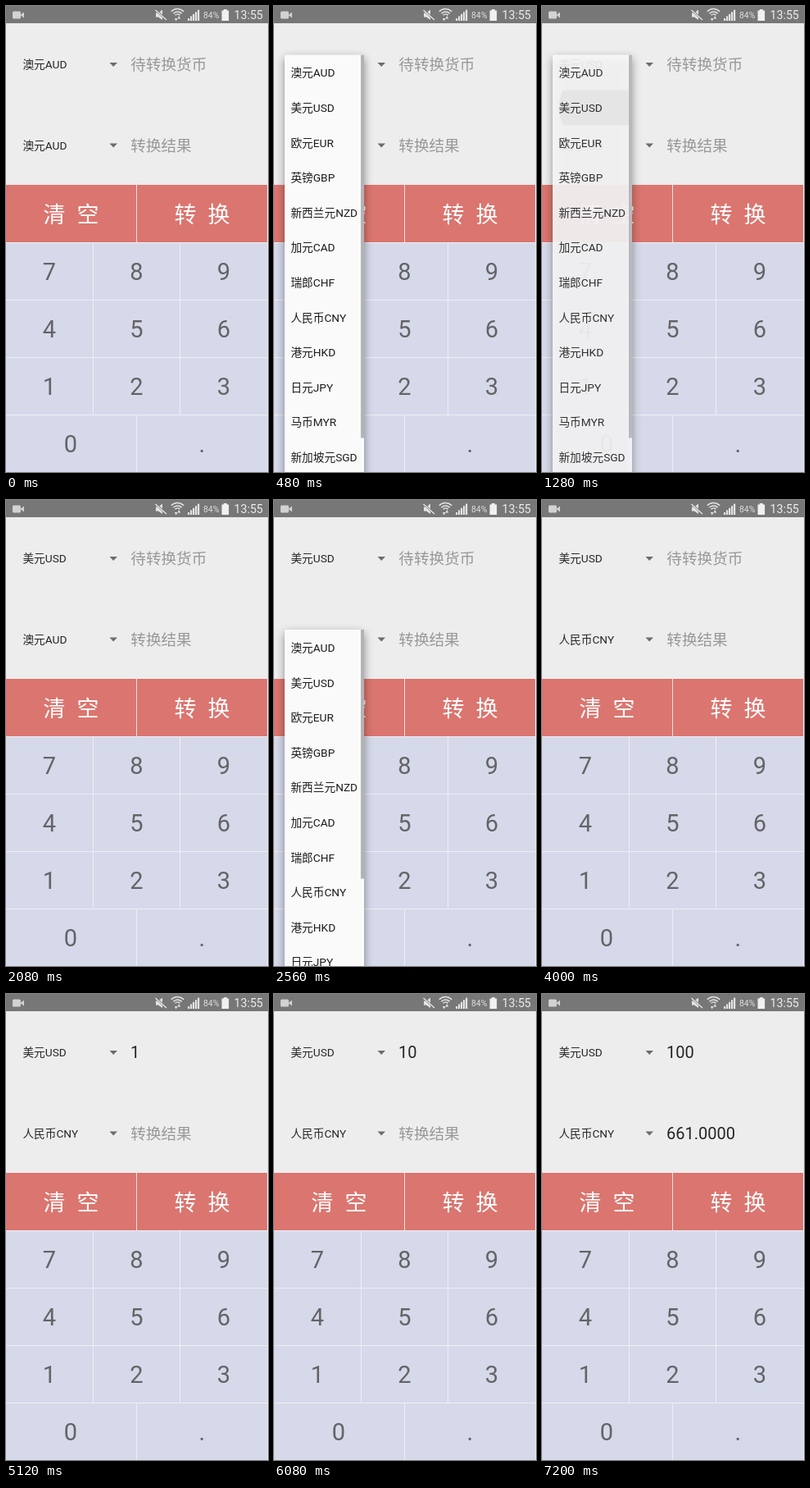
These frames come from a looping animation (320x568 px, 7360 ms). An HTML page with a canvas:

```html
<!DOCTYPE html>
<html lang="zh-CN">
<head>
<meta charset="utf-8">
<title>货币转换</title>
<style>
  html, body { margin: 0; width: 100%; height: 100%; overflow: hidden; background: #ededee; }
  canvas { display: block; width: 320px; height: 568px; }
</style>
</head>
<body>
<canvas id="stage"></canvas>
<script>
const W = 320, H = 568, LOOP = 7360, STEP = 160;
const FONT = 'Roboto, "Noto Sans CJK SC", "Noto Sans CJK", sans-serif';
const ITEMS = ['澳元AUD', '美元USD', '欧元EUR', '英镑GBP', '新西兰元NZD', '加元CAD', '瑞郎CHF',
  '人民币CNY', '港元HKD', '日元JPY', '马币MYR', '新加坡元SGD', '台币TWD'];
const ROW = 42.6, CONTENT = ROW * ITEMS.length;

const canvas = document.getElementById('stage');
const ctx = canvas.getContext('2d');
const ratio = window.devicePixelRatio || 1;
canvas.width = W * ratio;
canvas.height = H * ratio;
ctx.scale(ratio, ratio);

const clamp = v => Math.max(0, Math.min(1, v));
const ease = v => v * v * (3 - 2 * v);

function rect(x, y, w, h, color) {
  ctx.fillStyle = color;
  ctx.fillRect(x, y, w, h);
}

function text(str, x, y, size, color, align = 'left') {
  ctx.font = `${size}px ${FONT}`;
  ctx.textAlign = align;
  ctx.fillStyle = color;
  ctx.fillText(str, x, y);
}

function poly(points, color) {
  ctx.fillStyle = color;
  ctx.beginPath();
  points.forEach(([x, y]) => ctx.lineTo(x, y));
  ctx.fill();
}

function statusBar() {
  const ink = '#e4e4e4';
  rect(0, 0, W, 21, '#777777');

  // camera
  ctx.fillStyle = '#d2d2d2';
  ctx.beginPath();
  ctx.roundRect(8, 6.5, 10, 9, 1.5);
  ctx.fill();
  poly([[17.5, 11], [22, 7.5], [22, 14.5]], '#d2d2d2');

  // muted speaker
  poly([[183, 8.5], [186, 8.5], [191, 4.5], [191, 17], [186, 13.5], [183, 13.5]], ink);
  ctx.lineWidth = 2.6;
  ctx.strokeStyle = '#777777';
  line(183, 5, 196, 17);
  ctx.lineWidth = 1.4;
  ctx.strokeStyle = ink;
  line(182.5, 5, 196, 17);

  // wifi
  ctx.lineWidth = 1.5;
  for (const r of [4, 7, 10.5]) {
    ctx.beginPath();
    ctx.arc(209.5, 14, r, -Math.PI * 0.76, -Math.PI * 0.24);
    ctx.stroke();
  }
  poly([[205.8, 15], [209.6, 15], [207.7, 18.5]], ink);
  poly([[209.4, 15.5], [213.2, 15.5], [211.3, 12]], ink);

  // signal
  for (let i = 0; i < 5; i++) rect(222 + i * 3, 15 - i * 2.6, 2.2, 3 + i * 2.6, ink);

  text('84%', 241, 15.3, 10.4, '#dedede');
  rect(265.8, 4, 4, 2, '#f0f0f0');
  rect(263.5, 5.5, 8.6, 12.5, '#f0f0f0');
  text('13:55', 278.5, 16.2, 14.2, '#ececec');
}

function line(x1, y1, x2, y2) {
  ctx.beginPath();
  ctx.moveTo(x1, y1);
  ctx.lineTo(x2, y2);
  ctx.stroke();
}

function field(y, currency, value, hint) {
  text(currency, 20.4, y + 5, 13.7, '#272727');
  poly([[126.5, y - 2], [136, y - 2], [131.2, y + 3]], '#6c6c6c');
  if (value) text(value, 152, y + 7.3, 20, '#242424');
  else text(hint, 152.3, y + 7.2, 18.6, '#98989a');
}

function keypad() {
  const rule = '#edeff5';
  rect(0, 218, W, 70, '#db756f');
  rect(159, 218, 1, 70, '#f5dfdf');
  [['清', 59], ['空', 100], ['转', 219], ['换', 260]]
    .forEach(([c, x]) => text(c, x, 264, 27, '#ffffff', 'center'));

  rect(0, 288, W, 280, '#d6d9e9');
  for (let y = 288; y < H; y += 70) rect(0, y, W, 1, rule);
  rect(106, 288, 1, 210, rule);
  rect(212, 288, 1, 210, rule);
  rect(159, 498, 1, 70, rule);
  rect(319, 218, 1, 350, rule);

  const key = (c, x, y) => text(c, x, y, 29, '#646466', 'center');
  [...'789456123'].forEach((c, i) =>
    key(c, 53 + (i % 3) * 106.5, 334.4 + Math.floor(i / 3) * 70));
  key('0', 79, 544.4);
  key('.', 239.3, 544);
}

function popup(t, p) {
  const alpha = t < p.close ? clamp((t - p.open + 80) / 160) : clamp(0.9 - (t - p.close) / 160);
  if (t < p.open || alpha <= 0) return;
  const x = 13, w = 97, view = H - p.top;
  const scroll = p.scroll ? ease(clamp((t - p.scroll) / 480)) * (CONTENT - view) : 0;

  ctx.save();
  ctx.globalAlpha = alpha;
  ctx.save();
  ctx.shadowColor = 'rgba(0,0,0,0.42)';
  ctx.shadowBlur = 11 * ratio;
  ctx.shadowOffsetY = 4 * ratio;
  ctx.fillStyle = '#fafafb';
  ctx.beginPath();
  ctx.roundRect(x, p.top, w, view + 10, 2);
  ctx.fill();
  ctx.restore();

  ctx.beginPath();
  ctx.rect(x, p.top, w, view);
  ctx.clip();

  // touch ripple on the picked row
  const press = t - p.close + 320;
  if (press > 0) {
    ctx.save();
    ctx.beginPath();
    ctx.rect(x, p.top + p.pick * ROW - scroll + 0.6, 93.5, ROW);
    ctx.clip();
    ctx.fillStyle = '#e5e5e5';
    ctx.beginPath();
    ctx.arc(71, p.top + (p.pick + 0.5) * ROW - scroll, Math.min(50, press * 50 / 320), 0, 7);
    ctx.fill();
    ctx.restore();
  }

  ITEMS.forEach((name, i) =>
    text(name, 20.4, p.top + 27 + i * ROW - scroll, 13.7, '#1c1c1c'));
  rect(106, p.top + scroll / CONTENT * view, 4, view * view / CONTENT, '#b3b3b6');
  ctx.restore();
}

const FIRST = { top: 59.4, open: 160, close: 1280, pick: 1 };
const SECOND = { top: 158, open: 2240, close: 3520, pick: 7, scroll: 2560 };

function draw(t) {
  rect(0, 0, W, H, '#ededee');
  statusBar();
  const amount = t < 4960 ? '' : t < 5760 ? '1' : t < 6400 ? '10' : '100';
  field(71, ITEMS[t < FIRST.close ? 0 : FIRST.pick], amount, '待转换货币');
  field(169.5, ITEMS[t < SECOND.close ? 0 : SECOND.pick], t < 6880 ? '' : '661.0000', '转换结果');
  keypad();
  popup(t, FIRST);
  popup(t, SECOND);
}

const start = performance.now();
function tick() {
  const t = (performance.now() - start) % LOOP;
  draw(Math.floor(t / STEP) * STEP);
  requestAnimationFrame(tick);
}
tick();
</script>
</body>
</html>
```
